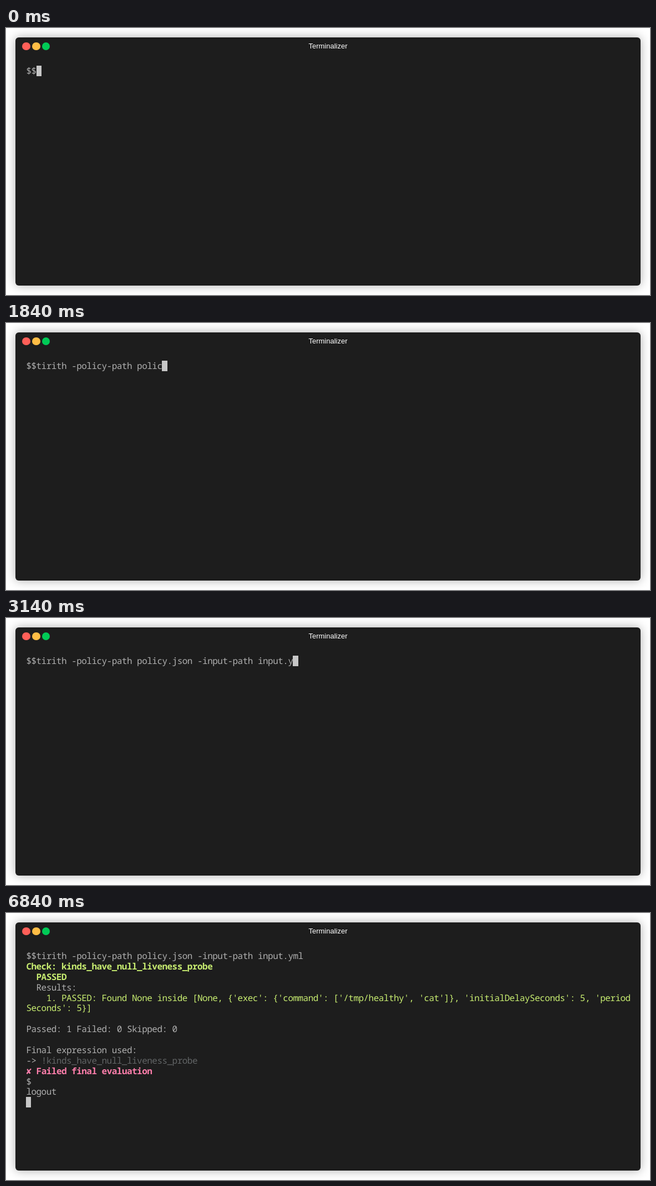
These frames come from a looping animation (1161x482 px, 7.08 s). An HTML page:

```html
<!DOCTYPE html>
<html lang="en">
<head>
<meta charset="utf-8">
<title>Terminal</title>
<style>
  html, body { margin: 0; width: 100%; height: 100%; overflow: hidden; background: #fff; }
  #stage { position: relative; width: 1161px; height: 482px; overflow: hidden; }
  #window {
    position: absolute; left: 17px; top: 17px; width: 1127px; height: 447.5px;
    border-radius: 6px; background: #1d1d1d; box-shadow: 0 0 18px rgba(0, 0, 0, .32);
  }
  .dot { position: absolute; top: 25.7px; width: 14.6px; height: 14.6px; border-radius: 50%; }
  #title {
    position: absolute; left: 0; top: 23px; width: 1161px; text-align: center; color: #fff;
    font: 13px/20px "Liberation Sans", Arial, sans-serif;
  }
  #screen {
    color: #afafaf; text-rendering: geometricPrecision; font-kerning: none;
    font: 16px/18.875px "Noto Sans Mono", "DejaVu Sans Mono", monospace;
    font-variant-ligatures: none;
  }
  .line { position: absolute; left: 36.4px; white-space: pre; }
  #cursor { position: absolute; width: 9.1px; height: 18.9px; background: #c7c7c7; }
  .green { color: #c8ed71; }
  .red { color: #ff7fac; }
  .dim { color: #626566; }
  .bold { font-weight: 700; }
</style>
</head>
<body>
<div id="stage">
  <div id="window"></div>
  <div class="dot" style="left:29.2px;background:#ff5f58"></div>
  <div class="dot" style="left:47px;background:#ffbd45"></div>
  <div class="dot" style="left:64.8px;background:#00ca56"></div>
  <div id="title">Terminalizer</div>
  <div id="screen"><div id="cursor"></div></div>
</div>
<script>
const LOOP = 7080, TYPE_START = 640, KEY = 50;
const OUTPUT = 3340, PROMPT = 4840, LOGOUT = 6840;
const LEFT = 36.4, TOP = 68, CELL_W = 9.077, CELL_H = 18.875;

const command = "tirith -policy-path policy.json -input-path input.yml";

// Each line is a list of [text, classes] runs.
const output = [
  [["Check: kinds_have_null_liveness_probe", "green bold"]],
  [["  PASSED", "green bold"]],
  [["  Results:"]],
  [["    1. PASSED: Found None inside [None, {'exec': {'command': ['/tmp/healthy', 'cat']}, 'initialDelaySeconds': 5, 'period", "green"]],
  [["Seconds': 5}]", "green"]],
  [],
  [["Passed: 1 Failed: 0 Skipped: 0"]],
  [],
  [["Final expression used:"]],
  [["-> "], ["!kinds_have_null_liveness_probe", "dim"]],
  [["✘ Failed final evaluation", "red bold"]]
];

const screen = document.getElementById("screen");
const cursor = document.getElementById("cursor");

function addLine(row, runs) {
  const line = document.createElement("div");
  line.className = "line";
  line.style.top = TOP + row * CELL_H + "px";
  for (const [text, style = ""] of runs) {
    const span = document.createElement("span");
    span.className = style;
    span.textContent = text;
    line.append(span);
  }
  screen.append(line);
  return line;
}

// Tighten the font's own advance to the terminal grid.
const probe = addLine(0, [["0".repeat(100)]]);
const advance = probe.getBoundingClientRect().width / 100;
probe.remove();
screen.style.letterSpacing = CELL_W - advance + "px";

const input = addLine(0, [["$$"]]);
const results = output.map((runs, i) => addLine(i + 1, runs));
const prompt = addLine(12, [["$ "]]);
const logout = addLine(13, [["logout"]]);

function show(line, on) {
  line.style.visibility = on ? "visible" : "hidden";
}

function cursorAt(t, keys) {
  if (t >= LOGOUT) return [0, 14];
  if (t >= PROMPT) return [2, 12];
  if (t >= OUTPUT) return [0, 12];
  return keys > command.length ? [0, 1] : [2 + keys, 0];
}

function draw(t) {
  const keys = Math.max(0, Math.floor((t - TYPE_START) / KEY) + 1);
  input.firstChild.textContent = "$$" + command.slice(0, keys);
  results.forEach(line => show(line, t >= OUTPUT));
  show(prompt, t >= PROMPT);
  show(logout, t >= LOGOUT);
  const [col, row] = cursorAt(t, keys);
  cursor.style.left = LEFT + col * CELL_W + "px";
  cursor.style.top = TOP + row * CELL_H + "px";
}

const start = performance.now();
function tick() {
  draw((performance.now() - start) % LOOP);
  requestAnimationFrame(tick);
}
tick();
</script>
</body>
</html>
```
